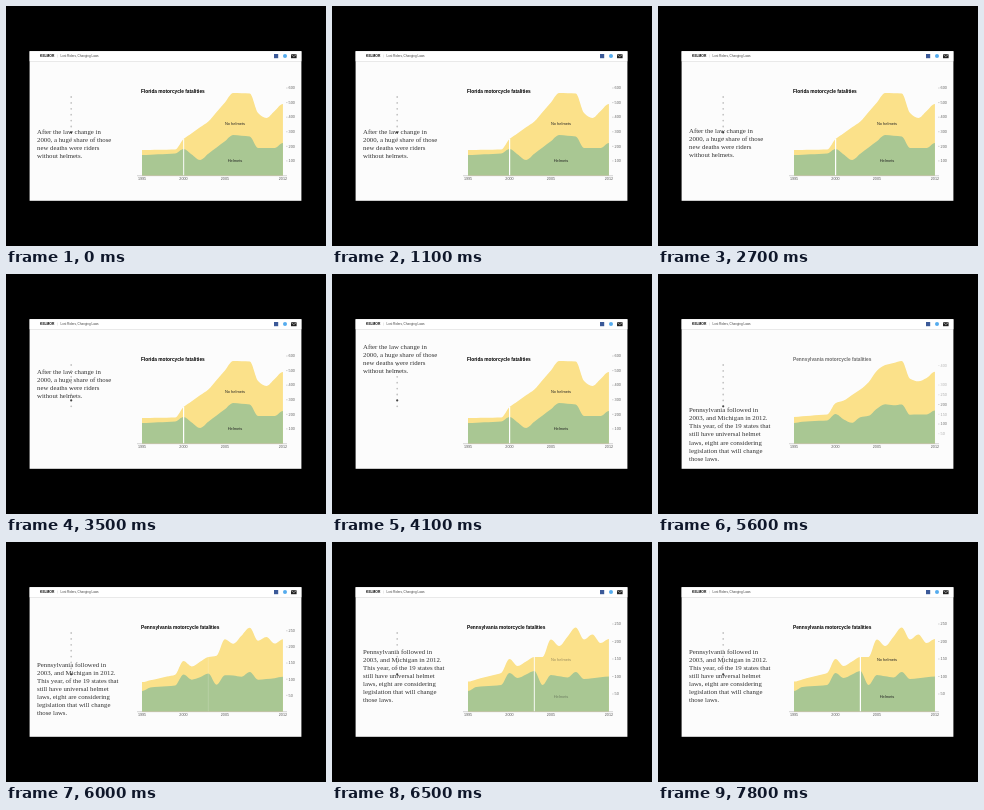
Animation, 320 px wide and 240 px high, one loop 8 s. Source, as an HTML page:

```html
<!DOCTYPE html>
<html lang="en">
<head>
<meta charset="utf-8">
<title>Motorcycle fatalities</title>
<style>
html, body { margin: 0; width: 100%; height: 100%; overflow: hidden; background: #000; }
svg { display: block; width: 100vw; height: 100vh; }
text { font-family: "Liberation Sans", Arial, sans-serif; fill: #222; }
.story text { font: 6.8px "Liberation Serif", "Times New Roman", serif; fill: #333; }
.title { font-size: 4.8px; font-weight: bold; fill: #000; }
.label { font-size: 4px; text-anchor: middle; }
.year { font-size: 3.7px; text-anchor: middle; fill: #555; }
.tick text { font-size: 3.8px; fill: #666; }
.tick path, .axis { stroke: #999; stroke-width: .4; }
.brand { font-size: 3.3px; font-weight: bold; fill: #000; }
.head { font-size: 3.05px; fill: #444; }
.law { stroke: #fff; stroke-width: 1.2; }
</style>
</head>
<body>
<svg viewBox="0 0 320 240">
  <defs><clipPath id="view"><rect x="24" y="56" width="271" height="138.5"/></clipPath></defs>
  <rect width="320" height="240"/>
  <rect x="23.6" y="45.2" width="271.8" height="149.6" fill="#fcfcfc"/>
  <rect x="23.6" y="45.2" width="271.8" height="10" fill="#fff"/>
  <path d="M24 55.5H295" stroke="#dcdcdc" stroke-width=".6"/>
  <text class="brand" x="34" y="51.2">KELMOR</text>
  <path d="M51.5 48.5V51.5" stroke="#ccc" stroke-width=".4"/>
  <text class="head" x="54.5" y="51.2">Lost Riders, Changing Laws</text>
  <rect x="268" y="48" width="4.2" height="4.2" fill="#3b5998"/>
  <circle cx="279" cy="50.1" r="2" fill="#55acee"/>
  <rect x="285" y="48.2" width="5.6" height="4" fill="#222"/>
  <path d="M285.3 48.7L287.8 50.6L290.3 48.7" fill="none" stroke="#fff" stroke-width=".5"/>

  <g clip-path="url(#view)">
    <path id="total" fill="#fbe18a"/>
    <path id="bare" fill="#a9c793"/>
    <path id="lawA" class="law" d="M177.6 133V169.5"/>
    <path id="lawB" class="law" d="M202.4 114.5V169.5"/>
    <path class="axis" d="M131 169.7H281"/>
    <g id="labels">
      <text class="label" x="229" y="118.5">No helmets</text>
      <text class="label" x="229" y="156.4">Helmets</text>
    </g>
    <text id="titleA" class="title" x="135" y="86.8">Florida motorcycle fatalities</text>
    <text id="titleB" class="title" x="135" y="86.8">Pennsylvania motorcycle fatalities</text>
    <g id="years"></g>
    <g id="ticksA"></g>
    <g id="ticksB"></g>
    <g id="dots"></g>
    <g id="storyA" class="story"></g>
    <g id="storyB" class="story"></g>
  </g>
</svg>
<script>
const LOOP = 8000, FRAME = 100;
const BASE = 169.5, LEFT = 136, YEAR = 8.29, YEARS = 18, LINE = 8.05;
const $ = id => document.getElementById(id);

const mix = (a, b, p) => a + (b - a) * p;
const span = (t, a, b) => Math.min(1, Math.max(0, (t - a) / (b - a)));
const quad = p => p < .5 ? 2 * p * p : 1 - 2 * (1 - p) ** 2;
const fade = (el, o) => el.setAttribute('opacity', o.toFixed(3));
const move = (el, y) => el.setAttribute('transform', `translate(0 ${y})`);

function add(parent, tag, attrs, text) {
  const el = document.createElementNS('http://www.w3.org/2000/svg', tag);
  for (const k in attrs) el.setAttribute(k, attrs[k]);
  if (text) el.textContent = text;
  parent.appendChild(el);
  return el;
}

// Turning points [years after 1995, y] spread over every year
function curve(...points) {
  return Array.from({ length: YEARS }, (_, i) => {
    const k = Math.max(1, points.findIndex(([x]) => x >= i));
    const [x0, y0] = points[k - 1], [x1, y1] = points[k];
    return mix(y0, y1, span(i, x0, x1));
  });
}
const florida = {
  total: curve([0, 144], [4, 143.5], [5, 133], [8, 115.5], [11, 87], [13, 87.5], [14, 107], [15, 112], [17, 98]),
  bare: curve([0, 149], [4, 147.5], [5, 143], [7, 154], [11, 129], [13, 130.5], [14, 142], [16, 142], [17, 137])
};
const penn = {
  total: curve([0, 139.5], [4, 131], [5, 117], [6, 124], [8, 115], [9, 115], [10, 97.5], [11, 104],
    [13, 85.5], [14, 97.5], [15, 92.5], [16, 101], [17, 97]),
  bare: curve([0, 149], [1, 145], [4, 143], [5, 131], [6, 136], [8, 129], [9, 143], [10, 133],
    [12, 135.5], [13, 130], [14, 137], [17, 134.5])
};

// Closed area under a monotone curve
function area(ys) {
  const slope = ys.map((y, i) => {
    const a = y - ys[i - 1], b = ys[i + 1] - y;
    return a * b > 0 ? 2 * a * b / (a + b) : 0;
  });
  let d = `M${LEFT} ${BASE}V${ys[0]}`;
  for (let i = 1; i < ys.length; i++) {
    const x = LEFT + i * YEAR;
    d += `C${x - YEAR * 2 / 3} ${ys[i - 1] + slope[i - 1] / 3} ${x - YEAR / 3} ${ys[i] - slope[i] / 3} ${x} ${ys[i]}`;
  }
  return d + `V${BASE}Z`;
}

function story(id, lines) {
  lines.forEach((s, i) => add($(id), 'text', { x: 31, y: 2.3 + i * LINE }, s));
}
story('storyA', ['After the law change in', '2000, a huge share of those', 'new deaths were riders', 'without helmets.']);
story('storyB', ['Pennsylvania followed in', '2003, and Michigan in 2012.', 'This year, of the 19 states that',
  'still have universal helmet', 'laws, eight are considering', 'legislation that will change', 'those laws.']);

for (const y of [1995, 2000, 2005, 2012])
  add($('years'), 'text', { class: 'year', x: LEFT + (y - 1995) * YEAR, y: 174.4 }, y);

function ticks(id, step, count) {
  return Array.from({ length: count }, (_, i) => {
    const value = step * (i + 1), el = add($(id), 'g', { class: 'tick' });
    add(el, 'path', { d: 'M280 0H281.6' });
    add(el, 'text', { x: 282.6, y: 1.3 }, value);
    return { value, el };
  });
}
const allTicks = [...ticks('ticksA', 100, 6), ...ticks('ticksB', 50, 5)];

const dots = Array.from({ length: 8 }, (_, i) => add($('dots'), 'circle', { cx: 65.2, cy: 91 + i * 5.9 }));

// Wheel gestures: start, end, notches
const gestures = [[2680, 2900, 1], [3000, 3900, 3 - 1], [3900, 4100, 1], [4200, 4500, 1],
  [4600, 5000, 3], [5000, 5600, 2], [5600, 6400, 2]];
const NOTCH = 13.3, GAP = 143;

function render(t) {
  const y = 126 - NOTCH * gestures.reduce((sum, [a, b, n]) => sum + n * span(t, a, b), 0);
  move($('storyA'), y);
  move($('storyB'), y + GAP);
  fade($('storyB'), span(t, 4600, 5500));

  const p = quad(span(t, 5250, 6260)), unit = mix(.1458, .35, p);
  for (const k of ['total', 'bare'])
    $(k).setAttribute('d', area(florida[k].map((v, i) => mix(v, penn[k][i], p))));

  for (const { value, el } of allTicks) {
    const top = mix(BASE - value * .1458, BASE - value * .35, p);
    move(el, top);
    fade(el, top < 80 ? 0 : 1);
  }
  fade($('ticksA'), 1 - span(t, 5250, 5900));
  fade($('ticksB'), span(t, 5250, 5900));

  const out = 1 - span(t, 5200, 5500);
  fade($('titleA'), out);
  fade($('titleB'), span(t, 5350, 5800));
  fade($('labels'), out + span(t, 6100, 7000));
  fade($('lawA'), out * mix(.8, 1, span(t, 200, 1100)));
  fade($('lawB'), span(t, 5900, 6700));

  const active = t < 5300 ? 6 : 7;
  dots.forEach((dot, i) => {
    dot.setAttribute('r', i === active ? 1.1 : .9);
    dot.setAttribute('fill', i === active ? '#444' : '#c4c4c4');
  });
}

const start = performance.now();
function loop() {
  const t = (performance.now() - start) % LOOP;
  render(Math.floor(t / FRAME) * FRAME);
  requestAnimationFrame(loop);
}
loop();
</script>
</body>
</html>
```
